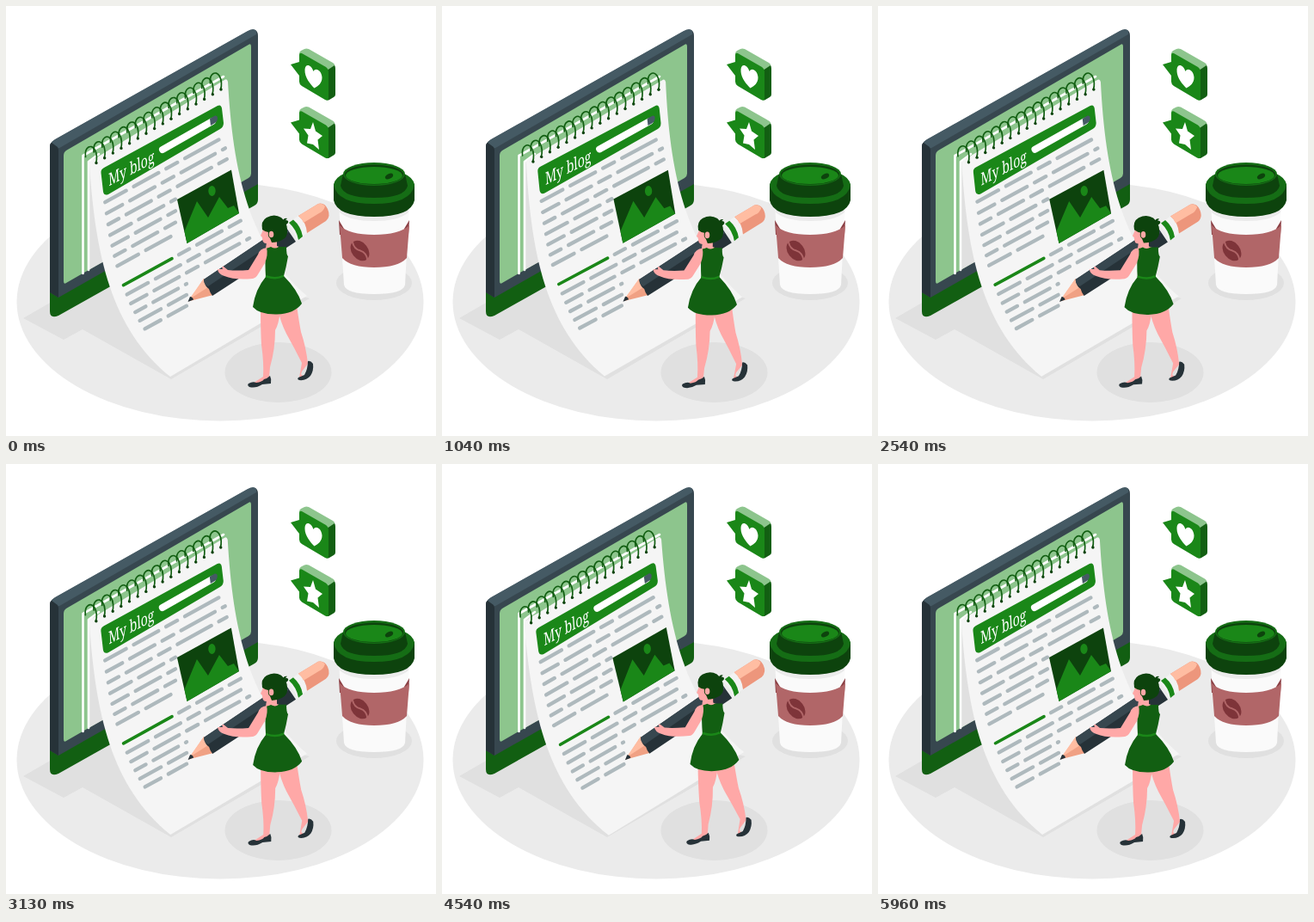
An HTML page that plays this animation: 500 px wide and 500 px high, repeating every 6 s.

```html
<!DOCTYPE html>
<html lang="en">
<head>
<meta charset="utf-8">
<title>My blog</title>
<style>
html, body { margin: 0; width: 100%; height: 100%; overflow: hidden; background: #fff; }
svg { display: block; width: 100vw; height: 100vh; }
.main { fill: #1a8718; }
.mid { fill: #156d15; }
.deep { fill: #125f12; }
.dark { fill: #0d430d; }
.light { fill: #8dc58d; }
.ink { fill: #263238; }
.slate { fill: #37474f; }
.shade { fill: #e0e0e0; }
.skin { fill: #ffa8a7; }
.white { fill: #fff; }
.line { fill: none; stroke-linecap: round; stroke-linejoin: round; }
.title { font: 500 20px "Noto Serif", serif; fill: #fff; }
</style>
</head>
<body>
<svg viewBox="0 0 500 500">
  <defs>
    <g id="bubble">
      <path class="light" d="M341 56Q341 53 343 52L347 50Q349 49 352 50L380 66Q383 68 382 70L374 75Z"/>
      <path class="deep" d="M373 75L382 69Q383 70 383 73V103Q383 105 381 106L376 109Q374 110 373 109Z"/>
      <path class="main" d="M341 57Q341 54 344 55L372 71Q375 73 375 77V107Q375 111 371 109L344 93Q341 91 341 88V81L331 68L341 65Z"/>
    </g>
  </defs>

  <!-- floor and shadows -->
  <ellipse cx="249" cy="344" rx="236.5" ry="138.5" fill="#ebebeb"/>
  <path class="shade" d="M20 363L150 288L353 340L192 434L89 376L67 388Z"/>
  <ellipse class="shade" cx="316.5" cy="426" rx="62" ry="35"/>
  <ellipse class="shade" cx="428" cy="322" rx="44" ry="20"/>

  <!-- monitor -->
  <path class="deep" d="M51 330L293 204V225Q293 230 289 232L61 360Q51 364 51 355Z"/>
  <path class="slate" d="M51 163Q51 159 56 156L280 30Q293 23 293 35V207L61 339L51 333Z"/>
  <path fill="#455a64" d="M53 159Q54 157 57 155L281 29Q288 25 291 29V33L64 164Q61 166 60 165Z"/>
  <path class="ink" d="M51 163Q51 160 53 159L60 164Q61 166 61 168V339L51 333Z"/>
  <path class="light" d="M67 174Q67 170 70 168L282 45Q285 43 285 47V195Q285 198 282 200L70 322Q67 324 67 320Z"/>
  <path class="shade" d="M96 307V181L130 165V288Z"/>
  <path class="line" d="M89.5 311V174L253 82M96 307V181L108 172" stroke="#fff" stroke-width="2.6"/>

  <!-- cup -->
  <path fill="#fafafa" d="M387 230L393 324Q395 335 428 335Q462 335 464 324L469 230Z"/>
  <path fill="#ebebeb" d="M387 232L388 240Q399 250 428 250Q457 250 468 240L469 232Z"/>
  <path fill="#8b3f44" d="M387 249L393 259L391 266H388ZM469 249L463 259L465 266H468Z"/>
  <path fill="#b16668" d="M388 255Q399 266 428 266Q457 266 469 255L466 293Q456 304 428 304Q401 304 391 293Z"/>
  <g transform="rotate(-38 411.500 284.500)">
    <ellipse cx="411.500" cy="284.500" rx="9.500" ry="13" fill="#7e3439"/>
    <path class="line" d="M411 271Q407 279 412 285Q416 291 412 298" stroke="#b16668" stroke-width="2"/>
  </g>
  <path class="dark" d="M381 208Q384 192 428 192Q472 192 475 208V226Q471 245 428 245Q385 245 381 226Z"/>
  <path class="mid" d="M381 208Q384 190 428 190Q472 190 475 208Q471 230 428 230Q385 230 381 208Z"/>
  <path class="dark" d="M392 195H464L467 209Q464 223 428 223Q392 223 389 209Z"/>
  <ellipse class="mid" cx="428" cy="195.500" rx="36" ry="13.500"/>
  <ellipse class="dark" cx="428" cy="196" rx="34" ry="11.500"/>
  <ellipse class="main" cx="428" cy="197" rx="33" ry="10"/>
  <ellipse class="dark" cx="445.500" cy="198" rx="5" ry="2.800" transform="rotate(-28 445.500 198)"/>

  <!-- reactions -->
  <use href="#bubble"/>
  <use href="#bubble" y="67.500"/>
  <path class="white" d="M357.500 76C355 68 348 66 347.500 74C347 83 354 91 358.500 95.500C363 93 367.500 90 367.500 83C367 75 360 71 357.500 76Z"/>
  <path class="white" d="M357 135L360 145.500L368 151L362.500 155.500L364 167L357 161L350 159.500L351.500 150.500L346 142.500L354 143Z"/>

  <!-- notepad and writer -->
  <g id="sway">
    <path fill="#f5f5f5" d="M97 184Q97 181 99 180L254 86Q257 84 258 88C264 193 282 278 350 337L191 431C122 375 104 290 97 184Z"/>
    <path class="main" d="M110.500 194Q110 190 114 188L246 116Q250 114 251 119L253 136Q253 141 249 143L119 219Q114 221 113 216Z"/>
    <text class="title" transform="matrix(.7 -.365 .05 1 119.500 209.500)">My blog</text>
    <path class="line" d="M182 167L240 134" stroke="#fff" stroke-width="8"/>
    <path d="M237 131L243 127.500Q246 127 246 130Q246 134 243 136L238 139Z" fill="#455a64"/>
    <g id="text" class="line" stroke="#aeb9bd" stroke-width="4.300"></g>
    <path class="dark" d="M199 225L262 190.500L271 241L210.500 276Z"/>
    <path class="main" d="M210.500 276L207.500 262L222 227L235 246L248 222L258 235L265 232L271 241Z"/>
    <ellipse class="main" cx="239.500" cy="215" rx="4.200" ry="6"/>
    <g id="rings" class="line" stroke="#125f12" stroke-width="1.700"></g>

    <!-- pencil -->
    <path fill="#f0a184" d="M212 343.500L230 317L241 336Z"/>
    <path fill="#ffbda2" d="M213 341L230 317L235 327Z"/>
    <path class="ink" d="M211.500 344L214 338Q217 338 218 341.500Z"/>
    <path class="ink" d="M230 318L324 255L337 274L240 337Q237 333 236 329Q231 326 230 318Z"/>
    <path class="slate" d="M230 318L324 255L329 263L235 326Q230 324 230 318Z"/>
    <path fill="#f2f2f2" d="M326 254L340 244Q349 251 351 263L338 273Q336 261 326 254Z"/>
    <path class="main" d="M329 252L334 248.500Q343 256 345 268L340 272Q338 260 329 252Z"/>
    <path fill="#ed967c" d="M340 244L363 230Q370 228 374 236Q378 245 372 250L350 264Q349 251 340 244Z"/>
    <path fill="#ffbda2" d="M340 244L363 230Q368 229 371 233Q369 239 364 241L346 252Q344 247 340 244Z"/>

    <!-- legs and shoes -->
    <path class="skin" d="M316 352L338 348Q341 369 343 379Q349 397 351 416L344 425L343 428L347 432L341 432L344 415Q335 397 326 381Q319 367 316 352Z"/>
    <path class="ink" d="M340 432L347 429Q351 422 351 413Q354 412 357 416Q358 424 354 430Q349 436 341 435Q338 434 340 432Z"/>
    <path class="skin" d="M296 350L319 354Q317 371 313 377Q313 399 307 420L306 431L300 438L285 440L299 431Q300 415 297 394Q296 376 296 350Z"/>
    <path class="ink" d="M282 439Q287 436 291 438Q298 437 300 434Q304 433 307 430Q309 434 308 439L298 440Q290 445 283 443Q280 441 282 439Z"/>

    <!-- body -->
    <path class="skin" d="M304 268H315V279L325 283L315 294L302 282Z"/>
    <path class="deep" d="M302 282Q306 281 308 280Q313 283 317 280L326 280Q326 290 328 291Q326 303 323 314Q339 330 344 346Q335 358 315 358.500Q295 359 287 350Q290 329 302 315Q301 300 302 282Z"/>
    <path class="line" d="M303 314.500Q314 318 322 314" stroke="#1a8718" stroke-width="2.500"/>
    <path class="skin" d="M303 281Q295 282 293 289L282 307Q268 308 258 307L253 303Q250 302 252 306L246 306Q247 312 254 314Q266 319 287 317Q291 316 293 312L301 299Q305 289 303 281Z"/>

    <!-- head -->
    <path class="skin" d="M300 257Q298 263 296 267L298 269Q298 276 302 276Q308 277 313 272L315 258Z"/>
    <path class="dark" d="M322 250Q323 246 327 247L325 249Q329 249 328 252Q326 255 322 255ZM298 260Q296 250 303 246Q312 241 320 246Q327 252 327 260Q328 269 321 272Q316 275 309 275L307 270Q304 268 305 263Q302 263 298 260Z"/>
    <ellipse class="skin" cx="308.500" cy="265.500" rx="2.800" ry="3.800"/>
  </g>
</svg>
<script>
const byId = id => document.getElementById(id);

// The left edge of the sheet, which every row of text follows.
const bezier = (t, a, b, c, d) =>
  (1 - t) ** 3 * a + 3 * (1 - t) ** 2 * t * b + 3 * (1 - t) * t * t * c + t ** 3 * d;
const slope = -.55;

function row(i) {
  const t = .17 + .0445 * i;
  const x = bezier(t, 97, 104, 122, 191) + 13.5;
  const y = bezier(t, 184, 290, 375, 431) - 8;
  const line = (from, to, style) =>
    `<path d="M${from} ${y + (from - x) * slope}L${to} ${y + (to - x) * slope}" ${style}/>`;
  const dashes = `stroke-dasharray="28 10 33 10 15 10 45 10" stroke-dashoffset="${i % 3 * 7}"`;
  if (i === 7) return "";
  if (i === 8) return line(x, 193, 'stroke="#1a8718" stroke-width="3.6"') + line(201, 273, dashes);
  const end = i < 3 || i === 9 || i === 10 ? x + 138 : i < 7 ? 197 : 210;
  return line(x, end, dashes);
}
byId("text").innerHTML = Array.from({ length: 14 }, (_, i) => row(i)).join("");

const count = 16;
byId("rings").innerHTML = Array.from({ length: count }, (_, i) => {
  const k = i / (count - 1);
  return `<g transform="translate(${105 + 145 * k} ${182.5 - 85.5 * k})">
    <path d="M-12.5 -7C-14 -19 -6 -22 -2 -16C1 -11 1 -4 -.5 0"/>
    <circle r="1.7" class="dark" stroke="none"/></g>`;
}).join("");

// Steady swing of one degree either way.
function draw(now) {
  const t = now / 6000 % 1;
  const angle = t < .25 ? 4 * t : t < .75 ? 2 - 4 * t : 4 * t - 4;
  byId("sway").setAttribute("transform", `rotate(${angle} 233 262)`);
  requestAnimationFrame(draw);
}
draw(performance.now());
</script>
</body>
</html>
```
